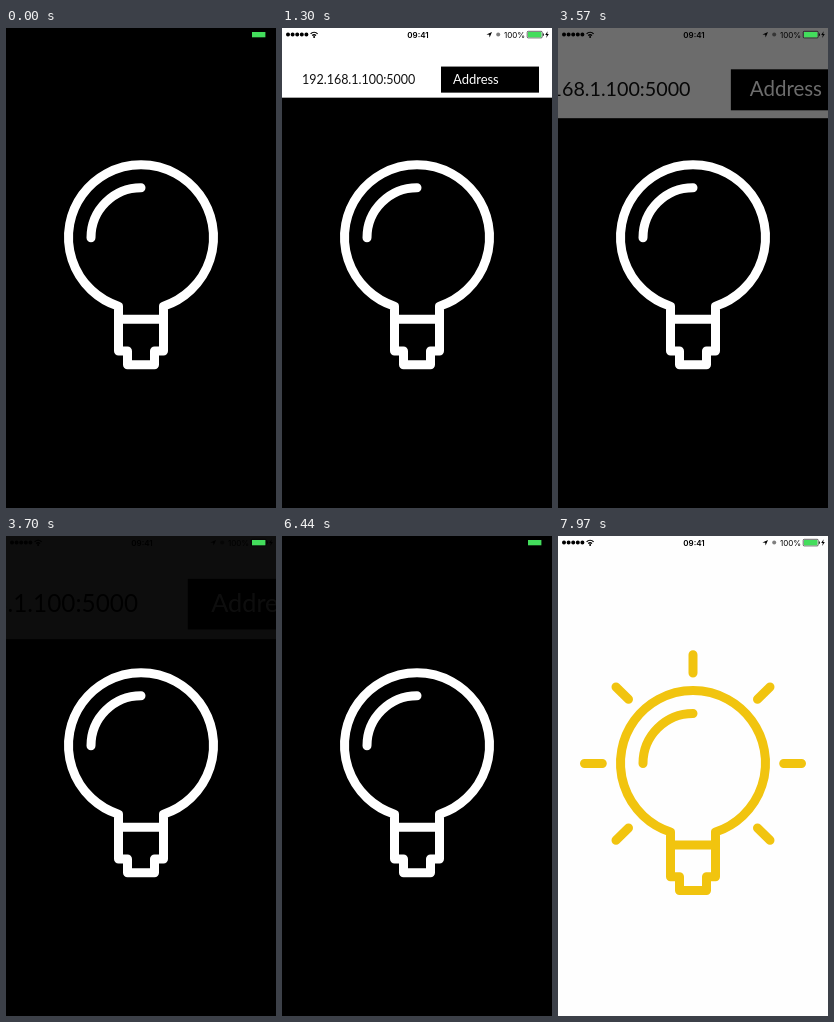
These frames come from a looping animation (270x480 px, 8 s). An HTML page:

```html
<!DOCTYPE html>
<html lang="en">
<head>
<meta charset="utf-8">
<title>Light switch</title>
<style>
  html, body { margin: 0; width: 100%; height: 100%; overflow: hidden; background: #000; }
  svg { display: block; width: 100vw; height: 100vh; }
  .line { fill: none; stroke-width: 9; stroke-linecap: round; stroke-linejoin: round; }
  .form { font-family: Lato, sans-serif; }
  .status { font: 8px Inter, sans-serif; }
</style>
</head>
<body>
<svg viewBox="0 0 270 480">
  <defs>
    <g id="bulb">
      <path d="M112.5 278.2A72.5 72.5 0 1 1 157.5 278.2V323H148.5V336.8H121.5V323H112.5Z"/>
      <path d="M112.5 291.3H157.5M85 209.7A50 50 0 0 1 135 159.7"/>
    </g>
  </defs>

  <rect id="room" width="270" height="480"/>

  <g id="off" class="line"><use href="#bulb"/></g>
  <g id="on" class="line" stroke="#f1c40f">
    <use href="#bulb" y="17.8"/>
    <path d="M135 118.8V137M26.5 227.5H44.3M225.7 227.5H243.5
             M58 151L70.5 163.3M212 151L199.5 163.3M58 304.3L70.5 292M212 304.3L199.5 292"/>
  </g>

  <g id="panel" class="form">
    <rect width="270" height="70" fill="#fff"/>
    <text x="20" y="56" font-size="12.5" fill="#111">192.168.1.100:5000</text>
    <rect x="159" y="39" width="98" height="26"/>
    <text x="171" y="56" font-size="13" fill="#fff">Address</text>
  </g>

  <g class="status">
    <path d="M6 6.5h.01M10.6 6.5h.01M15.2 6.5h.01M19.8 6.5h.01M24.4 6.5h.01"
          stroke="#000" stroke-width="4" stroke-linecap="round"/>
    <path d="M28.6 5.9a5 5 0 0 1 7 0M30.2 7.6a2.8 2.8 0 0 1 3.8 0"
          fill="none" stroke="#000" stroke-width="1.3"/>
    <circle cx="32.1" cy="9" r="1"/>
    <text x="136" y="9.6" text-anchor="middle" font-weight="600">09:41</text>
    <path d="M210 4L207.6 9.6L207.2 6.8L204.4 6.4Z"/>
    <circle cx="216.2" cy="6.6" r="2" opacity=".5"/>
    <text x="243.2" y="9.6" text-anchor="end">100%</text>
    <rect x="245.2" y="3.3" width="15" height="6.6" rx="1" fill="none" stroke="#000" stroke-width=".6"/>
    <rect x="246" y="4" width="13.4" height="5.3" fill="#43dd5c"/>
    <path d="M260.9 5.4h.9v2.4h-.9zM265.6 3.2L263.2 7H264.8L264.2 10L266.8 6H265.2Z"/>
  </g>
</svg>
<script>
  const LOOP = 8000, SHOW = 310, HIDE = 3408, SWITCH = 7770;
  const TAPS = [5100, 6370, 7700], TAP_LENGTH = 70;
  const get = id => document.getElementById(id);
  const room = get('room'), off = get('off'), on = get('on'), panel = get('panel');

  // Remaining distance of a one second spring with damping ratio 0.7.
  function spring(ms) {
    const t = ms / 1000;
    if (t <= 0) return 1;
    if (t >= 1) return 0;
    const decay = 6.9, freq = 7.05;
    return Math.exp(-decay * t) * (Math.cos(freq * t) + decay / freq * Math.sin(freq * t));
  }

  function place(y, sx, sy, alpha) {
    panel.setAttribute('transform', `translate(135 ${35 + y}) scale(${sx} ${sy}) translate(-135 -35)`);
    panel.setAttribute('opacity', Math.max(0, alpha));
  }

  function draw(t) {
    if (t < HIDE) {
      const q = spring(t - SHOW);
      place(-300 * q, 1, 1 + 2 * q, 1);
    } else {
      const q = spring(t - HIDE);
      place(0, 2 - q, 2 - q, q);
    }

    const lit = t >= SWITCH;
    const pressed = TAPS.some(tap => t >= tap && t < tap + TAP_LENGTH);
    off.style.display = lit ? 'none' : '';
    on.style.display = lit ? '' : 'none';
    off.setAttribute('stroke', pressed ? '#8c8c8c' : '#fff');

    const k = lit ? Math.min(1, (t - SWITCH + 30) / 220) : 0;
    const shade = Math.round(254 * k * (2 - k));
    room.setAttribute('fill', `rgb(${shade},${shade},${shade})`);
  }

  function tick() {
    draw(performance.now() % LOOP);
    requestAnimationFrame(tick);
  }
  tick();
</script>
</body>
</html>
```
